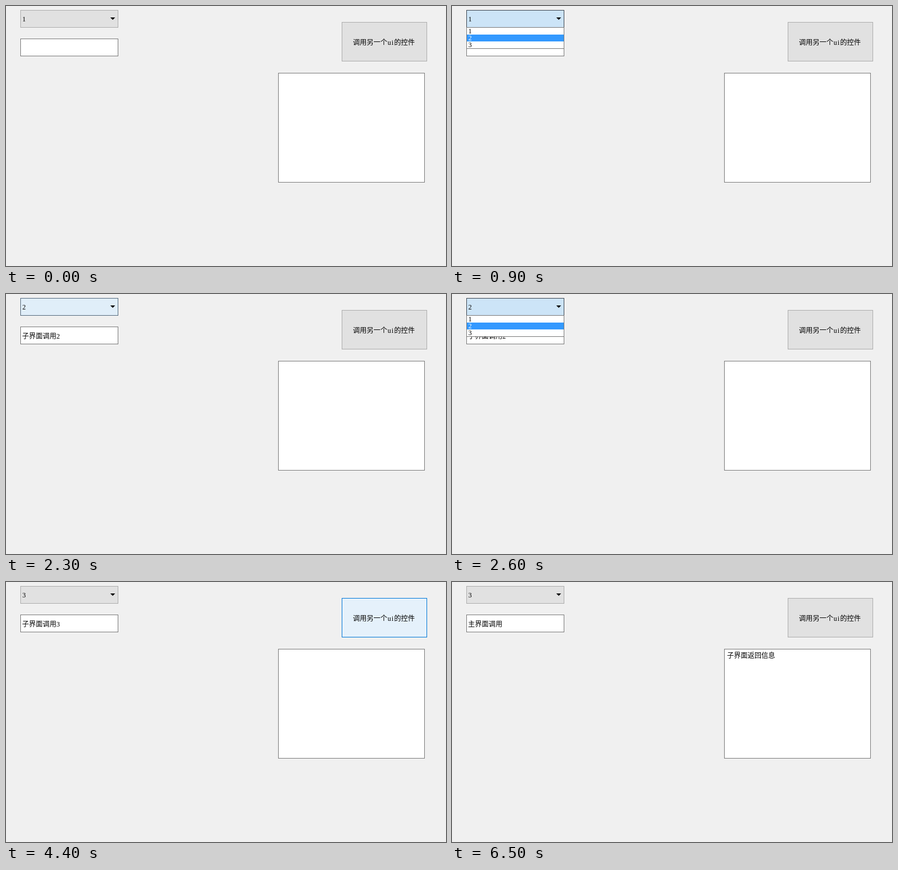
An HTML page for the animation above (7.1 s loop, 768 px wide and 455 px high).

```html
<!DOCTYPE html>
<html lang="zh-CN">
<head>
<meta charset="utf-8">
<title>控件调用</title>
<style>
  html, body { margin: 0; width: 100%; height: 100%; overflow: hidden; background: #f0f0f0; }
  svg { display: block; width: 768px; height: 455px; }
  rect { stroke-width: 1; }
  text { font: 12px "Liberation Serif", "Noto Sans CJK SC", "Noto Sans CJK JP", "Noto Sans CJK", serif; }
  .field { fill: #fff; stroke: #7a7a7a; }
</style>
</head>
<body>
<svg viewBox="0 0 768 455">
  <rect id="combo" x="25.5" y="7.5" width="170" height="30"/>
  <text id="value" x="28.5" y="27"></text>
  <path d="M182 20H190.500L186.250 24.250Z"/>

  <rect id="edit" class="field" x="25.5" y="57.5" width="170" height="30"/>
  <text id="message" x="28" y="78"></text>

  <g id="popup">
    <rect class="field" x="25.5" y="37.5" width="170" height="37"/>
    <rect id="highlight" x="26" width="169" height="12" fill="#3399ff"/>
    <text class="item" x="28.5" y="48">1</text>
    <text class="item" x="28.5" y="60">2</text>
    <text class="item" x="28.5" y="72">3</text>
  </g>

  <rect id="button" x="586.5" y="28.5" width="148" height="68"/>
  <text x="605.5" y="68">调用另一个<tspan x="666">u</tspan><tspan x="673">i</tspan><tspan x="677.500">的控件</tspan></text>

  <rect class="field" x="475.5" y="117.5" width="255" height="191"/>
  <text id="reply" x="480" y="133"></text>
</svg>
<script>
const LOOP = 7100;
const $ = id => document.getElementById(id);
const items = document.querySelectorAll('.item');

// Fill and border of each control state.
const comboLook = {
  normal: ['#e1e1e1', '#adadad'],
  warming: ['#e3e9ee', '#8a959e'],
  hover: ['#e5f1fb', '#66788a'],
  easing: ['#e0eef9', '#566b7e'],
  closing: ['#d6e9f8', '#4a5c6c'],
  nearPressed: ['#cde3f7', '#41505e'],
  pressed: ['#cce4f7', '#3c4650']
};
const buttonLook = {
  normal: ['#e1e1e1', '#adadad'],
  half: ['#e3e9ee', '#5793c2'],
  hover: ['#e5f1fb', '#0078d7'],
  pressed: ['#cce4f7', '#005499']
};
const editLook = { normal: '#7a7a7a', half: '#494949', hover: '#171717' };

// Each step lists only what changes; open is the highlighted popup row, 0 when closed.
const steps = [
  [0, { combo: 'normal', button: 'normal', edit: 'normal', value: 1, open: 0, message: '', reply: '' }],
  [400, { edit: 'half' }],
  [500, { edit: 'normal', combo: 'warming' }],
  [600, { combo: 'hover' }],
  [700, { combo: 'pressed', open: 1 }],
  [900, { open: 2 }],
  [1200, { combo: 'nearPressed', open: 0, value: 2, message: '子界面调用2' }],
  [1300, { combo: 'easing' }],
  [1400, { combo: 'hover' }],
  [1500, { combo: 'nearPressed', open: 2 }],
  [1600, { combo: 'pressed' }],
  [1900, { open: 3 }],
  [2100, { combo: 'nearPressed', open: 0 }],
  [2200, { combo: 'closing' }],
  [2300, { combo: 'easing' }],
  [2400, { combo: 'hover' }],
  [2500, { combo: 'nearPressed', open: 2 }],
  [2600, { combo: 'pressed' }],
  [3000, { open: 3 }],
  [3300, { combo: 'nearPressed', open: 0, value: 3, message: '子界面调用3' }],
  [3400, { combo: 'warming' }],
  [3500, { combo: 'normal', edit: 'hover' }],
  [3900, { edit: 'half' }],
  [4000, { edit: 'normal' }],
  [4200, { edit: 'half' }],
  [4300, { edit: 'normal', button: 'half' }],
  [4400, { button: 'hover' }],
  [4900, { button: 'pressed' }],
  [5000, { button: 'hover', message: '主界面调用', reply: '子界面返回信息' }],
  [5300, { button: 'half' }],
  [5400, { button: 'normal' }],
  [5900, { button: 'half' }],
  [6000, { button: 'half' }],
  [6100, { button: 'hover' }],
  [6400, { button: 'half' }],
  [6500, { button: 'normal' }]
];

function paint(id, [fill, stroke]) {
  $(id).style.fill = fill;
  $(id).style.stroke = stroke;
}

function render(time) {
  const state = Object.assign({}, ...steps.filter(([at]) => at <= time).map(([, change]) => change));
  paint('combo', comboLook[state.combo]);
  paint('button', buttonLook[state.button]);
  paint('edit', ['#fff', editLook[state.edit]]);
  for (const id of ['value', 'message', 'reply']) $(id).textContent = state[id];
  $('popup').style.display = state.open ? '' : 'none';
  $('highlight').setAttribute('y', 26 + 12 * state.open);
  items.forEach((item, i) => item.style.fill = i + 1 === state.open ? '#fff' : '#000');
}

const start = performance.now();
function tick() {
  render((performance.now() - start) % LOOP);
  requestAnimationFrame(tick);
}
tick();
</script>
</body>
</html>
```
